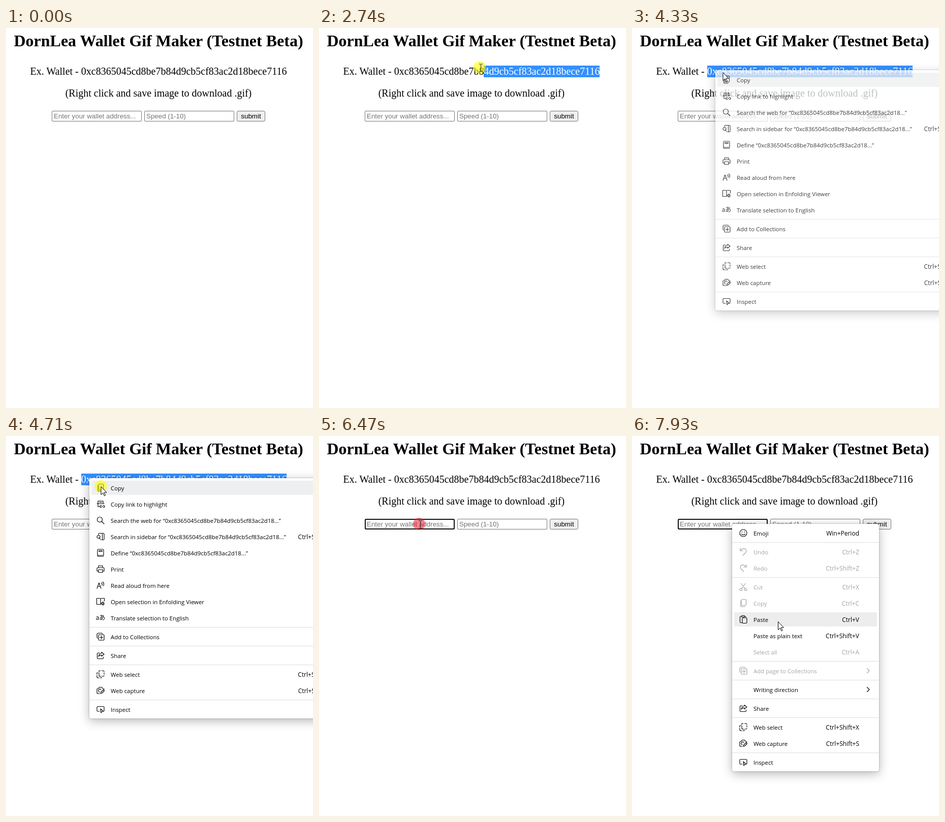
Write an HTML page that moves like this. It is 604 px wide and 748 px high and loops after 8000 ms.

```html
<!DOCTYPE html>
<html lang="en">
<head>
<meta charset="utf-8">
<title>Wallet Gif Maker</title>
<style>
  html, body { margin: 0; width: 100%; height: 100%; overflow: hidden; background: #fff; }
  svg { display: block; }
  .page { font: 20px "Liberation Serif", "Times New Roman", serif; text-anchor: middle; }
  .page .title { font-size: 32px; font-weight: bold; }
  .form { font: 13.333px "Liberation Sans", Arial, sans-serif; }
  .hint { fill: #757575; }
  .field { fill: #fff; stroke: #767676; }
  .menu { font: 11.4px "Open Sans", "Noto Sans", sans-serif; color: #000; }
  .menu text { fill: currentColor; }
  .menu .keys { font-size: 12px; text-anchor: end; }
  .menu .kana { font: 500 12px "Noto Sans CJK JP", "Noto Sans CJK", sans-serif; text-anchor: middle; }
  .menu path { fill: none; stroke: currentColor; stroke-width: 1.15; stroke-linejoin: round; stroke-linecap: round; }
  .menu .off { color: #a3a3a3; }
  .menu .sep { stroke: #dedede; stroke-width: 1; }
  .panel { fill: #fff; filter: drop-shadow(0 0 1.5px rgba(0,0,0,.3)) drop-shadow(0 5px 10px rgba(0,0,0,.28)); }
  .mini { filter: drop-shadow(0 1px 4px rgba(0,0,0,.2)); }
</style>
</head>
<body>
<svg id="stage" width="604" height="748" viewBox="0 0 604 748">
  <defs><clipPath id="cut"><rect id="cutBox" y="74" height="23"/></clipPath></defs>

  <g class="page">
    <text class="title" x="300" y="36">DornLea Wallet Gif Maker (Testnet Beta)</text>
    <text id="line" x="300" y="92">Ex. Wallet - 0xc8365045cd8be7b84d9cb5cf83ac2d18bece7116</text>
    <g clip-path="url(#cut)">
      <rect x="140" y="74" width="420" height="23" fill="#3390ff"/>
      <text id="picked" x="300" y="92" fill="#fff"></text>
    </g>
    <text x="300" y="135">(Right click and save image to download .gif)</text>
  </g>

  <g class="form">
    <rect id="wallet" class="field" x="90.5" y="163.5" width="176" height="20" rx="1.5"/>
    <rect id="focus" x="91" y="164" width="175" height="19" rx="2" fill="#fff" stroke="#101010" stroke-width="2"/>
    <text class="hint" x="94" y="178">Enter your wallet address...</text>
    <rect id="caret" x="94" y="166" width="1" height="15"/>
    <rect class="field" x="272.5" y="163.5" width="176" height="20" rx="1.5"/>
    <text class="hint" x="276" y="178">Speed (1-10)</text>
    <rect x="454.5" y="163.5" width="55" height="20" rx="2.5" fill="#efefef" stroke="#767676"/>
    <text x="482" y="178" text-anchor="middle">submit</text>
  </g>

  <g id="mini">
    <rect class="mini" x="165" y="29" width="44.5" height="34" rx="4" fill="#fff"/>
    <g fill="#85858c">
      <circle cx="187.5" cy="41" r="1.4"/><circle cx="187.5" cy="46" r="1.4"/><circle cx="187.5" cy="51" r="1.4"/>
    </g>
  </g>

  <g id="menuA" class="menu"></g>
  <g id="menuB" class="menu"></g>

  <g id="pointer">
    <circle id="press" r="12"/>
    <path id="arrow" d="M.5.5v16l3.8-3.6 2.6 5.9 2.2-1-2.6-5.7h5z" fill="#fff" stroke="#000"/>
    <path id="beam" d="M-1-6.5h2.5l1 .6 1-.6H6M2.5-6V8M-1 8.5h2.5l1-.6 1 .6H6" fill="none" stroke="#222"/>
  </g>
</svg>

<script>
const $ = id => document.getElementById(id);

// Icons are drawn around their own centre.
const icons = {
  copy: 'M-2-7.5H4Q5.5-7.5 5.5-6V3Q5.5 4.5 4 4.5H-2Q-3.5 4.5-3.5 3V-6Q-3.5-7.5-2-7.5M-5.5-5V4Q-5.5 7-3 7H3',
  link: 'M-5-1V-6H5V-1M-7-1H7M-5-1V5H-2M-2-3.5H2M2 2.5H1A2 2 0 0 0 1 6.5H2M5 2.5H6A2 2 0 0 1 6 6.5H5M2 4.5H5',
  search: 'M-6.5-1.5A5 5 0 1 0 3.5-1.5A5 5 0 1 0-6.5-1.5M2 2L7 7',
  sidebar: 'M-4-4V-5Q-4-6.5-2.5-6.5H5.5Q7-6.5 7-5V5Q7 6.5 5.5 6.5H2M3.5-6.5V6.5M-7 .5A3 3 0 1 0-1 .5A3 3 0 1 0-7 .5M-2 3L0 6',
  book: 'M-4.5-7H4.5Q6-7 6-5.5V5H-6V-5.5Q-6-7-4.5-7M-6 5Q-6 7-4.5 7H6M-3-4.5H3V-2.5H-3Z',
  print: 'M-4-3V-6.5H4V-3M-4 4H-7V-1Q-7-3-5-3H5Q7-3 7-1V4H4M-4 1H4V6.5H-4Z',
  aloud: 'M-7 6L-3-5L1 6M-5.5 2H-.5M2-5Q4-3 3 0M4.5-7Q8-3 5.5 1',
  reader: 'M-1 5.5H-7.5V-6.5H-2Q0-6.5 0-5Q0-6.5 2-6.5H7.5V-1M0-5V5.5M1.5 2.5H3L5 .5V7L3 5H1.5ZM6.500 2Q8 4 6.5 6',
  collect: 'M-4-2.5Q-4-4-2.5-4H5.5Q7-4 7-2.5V5.5Q7 7 5.5 7H-2.5Q-4 7-4 5.5ZM-6 3Q-7 2-7 0V-4Q-7-7-4-7H1Q3-7 4-6M1.5-1.5V4.5M-1.5 1.5H4.5',
  share: 'M-2-5H-5Q-6.5-5-6.5-3.5V5Q-6.5 6.5-5 6.5H4Q5.5 6.5 5.5 5V3M2-6.5L7-2.5L2 1.5V-1Q-2-1-4 2Q-3-4 2-4.5Z',
  select: 'M-3-5V-7H0M2.5-7H5Q7-7 7-5M7-3V0M7 2.5Q7 4 5 4H3M-3-3V2Q-3 4-1 4H1M-5-3H-7V0M-7 2V5Q-7 7-5 7H-3M-1 7H2V6',
  capture: 'M-2 6H-5Q-7 6-7 4V-2Q-7-4-5-4H-4L-2.5-6.5H2.5L4-4H5Q7-4 7-2M1-2A3 3 0 1 0-2 3M0 6L1 3L5.5-1.5L7.5 .5L3 5Z',
  inspect: 'M-2 4H-5.5Q-7 4-7 2.5V-4Q-7-5.5-5.5-5.5H5.5Q7-5.5 7-4V2.5Q7 4 6 4M0-1L1 7L2.5 4.5L5.5 4Z',
  emoji: 'M-7 0A7 7 0 1 0 7 0A7 7 0 1 0-7 0M-3.5 2Q0 5.5 3.5 2M-2.5-2.5V-1.5M2.5-2.5V-1.5',
  undo: 'M-6-7V-2H-1M-6-2L-2-5.5Q2-7.5 5-4.5Q7-1.5 4.5 1.5L-1 7',
  redo: 'M6-7V-2H1M6-2L2-5.5Q-2-7.5-5-4.5Q-7-1.5-4.5 1.5L1 7',
  cut: 'M-4.5-7L3 3M4.5-7L-3 3M-7 5A2.3 2.3 0 1 0-2.4 5A2.3 2.3 0 1 0-7 5M2.4 5A2.3 2.3 0 1 0 7 5A2.3 2.3 0 1 0 2.4 5',
  paste: 'M-3-6H-5Q-6.5-6-6.5-4.5V5Q-6.5 6.5-5 6.5H-2M-3-7.5H2V-4.5H-3ZM2-6H3.5Q5-6 5-4.5M-.5-3H5.5Q7-3 7-1.5V6Q7 7.5 5.5 7.5H-.5Q-2 7.5-2 6V-1.5Q-2-3-.5-3',
  more: 'M-2.5-4.5L2 0L-2.5 4.5'
};

const quote = '“0xc8365045cd8be7b84d9cb5cf83ac2d18...”';

// Rows: icon, label, keys, flags (d = disabled, m = submenu); a dash is a separator.
const rowsA = [
  ['copy', 'Copy', 'Ctrl+C'], ['link', 'Copy link to highlight'],
  ['search', 'Search the web for ' + quote],
  ['sidebar', 'Search in sidebar for ' + quote, 'Ctrl+Shift+E'],
  ['book', 'Define ' + quote], ['print', 'Print'],
  ['aloud', 'Read aloud from here'], ['reader', 'Open selection in Enfolding Viewer'],
  ['kana', 'Translate selection to English'], '-',
  ['collect', 'Add to Collections'], '-', ['share', 'Share'], '-',
  ['select', 'Web select', 'Ctrl+Shift+X'], ['capture', 'Web capture', 'Ctrl+Shift+S'], '-',
  ['inspect', 'Inspect']
];
const rowsB = [
  ['emoji', 'Emoji', 'Win+Period'], '-',
  ['undo', 'Undo', 'Ctrl+Z', 'd'], ['redo', 'Redo', 'Ctrl+Shift+Z', 'd'], '-',
  ['cut', 'Cut', 'Ctrl+X', 'd'], ['copy', 'Copy', 'Ctrl+C', 'd'], ['paste', 'Paste', 'Ctrl+V'],
  ['', 'Paste as plain text', 'Ctrl+Shift+V'], ['', 'Select all', 'Ctrl+A', 'd'], '-',
  ['collect', 'Add page to Collections', '', 'dm'], '-', ['', 'Writing direction', '', 'm'], '-',
  ['share', 'Share'], '-',
  ['select', 'Web select', 'Ctrl+Shift+X'], ['capture', 'Web capture', 'Ctrl+Shift+S'], '-',
  ['inspect', 'Inspect']
];

function icon(name, x, y) {
  if (name === 'kana') return `<text class="kana" x="${x}" y="${y + 3.5}">aあ</text>`;
  return name ? `<path transform="translate(${x} ${y})" d="${icons[name]}"/>` : '';
}

function buildMenu(id, x, y, w, h, rows, first, pick, shade) {
  let cy = y + first;
  let html = `<rect class="panel" x="${x}" y="${y}" width="${w}" height="${h}" rx="4"/>`;
  for (const row of rows) {
    if (row === '-') {
      html += `<path class="sep" d="M${x} ${cy - 13.5}h${w}"/>`;
      cy += 5;
      continue;
    }
    const [name, label, keys = '', flags = ''] = row;
    if (label === pick)
      html += `<rect class="hover" x="${x + 4}" y="${cy - 14}" width="${w - 8}" height="28" rx="3" fill="${shade}"/>`;
    html += `<g class="${flags.includes('d') ? 'off' : ''}">${icon(name, x + 22, cy)}
      <text x="${x + 42}" y="${cy + 4.5}">${label}</text>
      <text class="keys" x="${x + w - 39}" y="${cy + 4.5}">${keys}</text>
      ${flags.includes('m') ? icon('more', x + w - 21, cy) : ''}</g>`;
    cy += 32;
  }
  $(id).innerHTML = html;
}
buildMenu('menuA', 164, 83, 515, 473, rowsA, 19, 'Copy', '#eeeff0');
buildMenu('menuB', 197, 173, 289, 487, rowsB, 18, 'Paste', '#ededed');
const pasteHover = $('menuB').querySelector('.hover');

// Pointer path: step, x, y
const path = [
  [0, 586, 114], [5, 552, 83], [7, 552, 83], [8, 554, 83], [11, 554, 83],
  [17, 316, 77.5], [21, 184, 75], [25, 153, 78], [26, 152, 78], [28, 150, 78],
  [30, 150.5, 78], [34, 164, 84], [36, 164, 83], [38, 178.5, 87], [41, 186, 98],
  [45, 187, 100], [46, 190, 107], [49, 201.5, 152], [52, 197, 173], [69, 197, 173],
  [76, 278, 318], [77, 280, 328], [81, 287, 364], [85, 287, 365]
];

function along(k) {
  const i = path.findIndex(p => p[0] > k);
  if (i < 0) return path[path.length - 1].slice(1);
  if (i === 0) return path[0].slice(1);
  const [a, ax, ay] = path[i - 1], [b, bx, by] = path[i];
  const u = (k - a) / (b - a);
  return [ax + (bx - ax) * u, ay + (by - ay) * u];
}

const line = $('line');
$('picked').textContent = line.textContent;
const start = line.textContent.indexOf('0x');
const edges = [];
for (let i = start; i < line.textContent.length; i++) edges.push(line.getStartPositionOfChar(i).x);
const selEnd = Math.round(line.getEndPositionOfChar(line.textContent.length - 1).x);
edges.push(selEnd);

const within = (k, a, b) => k >= a && k < b;
const show = (id, on) => { $(id).style.display = on ? '' : 'none'; };
const fadeIn = n => n < 0 ? 0 : [.4, .75, .95][n] ?? 1;

function selectTo(x) {
  const left = Math.round(edges.reduce((a, b) => Math.abs(b - x) < Math.abs(a - x) ? b : a));
  $('cutBox').setAttribute('x', left);
  $('cutBox').setAttribute('width', selEnd - left);
}

function draw(t) {
  const k = Math.floor((t - 1426) / 76.2);
  const [x, y] = along(k);
  const beam = within(k, 11, 30) || within(k, 51, 68);
  const red = within(k, 36, 37) || within(k, 66, 68);
  const yellow = within(k, 11, 30) || within(k, 42, 44) || k === 59;

  show('pointer', k >= 0);
  $('pointer').setAttribute('transform', `translate(${x} ${y})`);
  show('beam', beam);
  show('arrow', !beam);
  show('press', red || yellow);
  $('press').setAttribute('fill', red ? 'rgba(230,30,45,.55)' : 'rgba(255,255,0,.6)');

  // The selection trails the pointer slightly.
  selectTo(within(k, 11, 59) ? (k < 28 ? along(k - .2)[0] : 0) : selEnd);

  $('mini').style.opacity = within(k, 30, 36) ? [.5, .75, .9][k - 30] ?? 1 : 0;
  $('menuA').style.opacity = k < 44 ? fadeIn(k - 37) : [.5, .15][k - 44] ?? 0;
  $('menuB').style.opacity = fadeIn(k - 67);
  pasteHover.style.display = y > 345 ? '' : 'none';

  $('wallet').style.stroke = within(k, 51, 59) ? '#4f4f4f' : '';
  show('focus', k >= 59);
  show('caret', within(k, 59, 66) || within(k, 72, 79));
}

function tick() {
  draw(performance.now() % 8000);
  requestAnimationFrame(tick);
}
tick();
</script>
</body>
</html>
```
